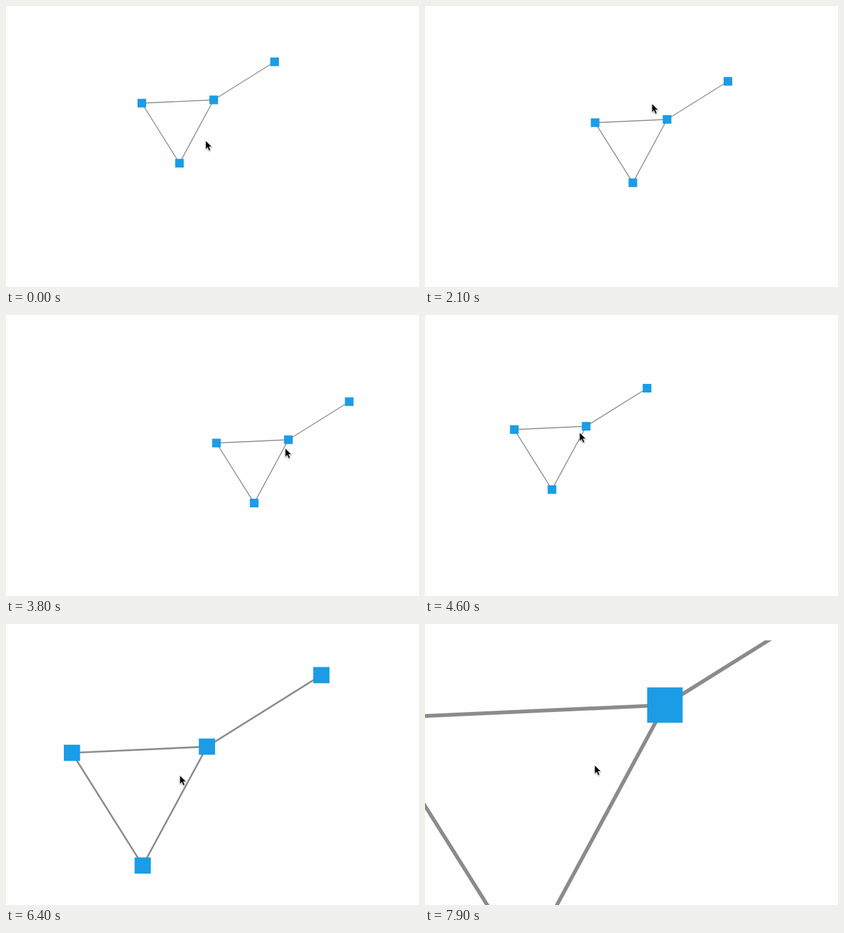
An HTML page for the animation above (8000 ms loop, 628 px wide and 428 px high).

```html
<!DOCTYPE html>
<html lang="en">
<head>
<meta charset="utf-8">
<title>Graph pan and zoom</title>
<style>
  html, body { margin: 0; width: 100%; height: 100%; overflow: hidden; background: #fefefe; }
  svg { display: block; }
  .edge { stroke: #8b8b8b; }
  .node { fill: #1b9ce5; }
  #cursor { filter: drop-shadow(0 1.2px 1px rgba(0, 0, 0, .35)); }
</style>
</head>
<body>
<svg width="628" height="428" viewBox="0 0 628 428">
  <clipPath id="view"><rect y="25" width="628" height="403"/></clipPath>
  <g id="graph" clip-path="url(#view)"></g>
  <path id="cursor" d="M0 0V13.2L3 10.4L5.2 15.4L7.6 14.4L5.4 9.5H9.6Z"
        stroke="#fff" stroke-width=".7" stroke-linejoin="round"/>
</svg>
<script>
const DURATION = 8000, STEP = 100, ZOOM_START = 5500;
const NODE = 13.15, EDGE = 1.4;

// Node positions relative to the hub, which is the second node.
const nodes = [[-109.3, 5], [0, 0], [-52, 96.4], [92.6, -58]];
const edges = [[0, 1], [1, 2], [2, 0], [1, 3]];

// Panning swings the hub between these turning points: [time, position].
const swingX = [[0, 315.8], [1200, 319.3], [1800, 322.7], [2300, 392], [3000, 138.5], [3950, 448], [4500, 242], [5100, 287.8]];
const swingY = [[0, 143], [1200, 141], [1850, 138.7], [2600, 275], [3320, 129], [4280, 251], [4750, 145], [5100, 204.9]];

// Zooming: [time, log of scale] and [scale, hub x, hub y].
const zoomKeys = [[ZOOM_START, 1], [6300, 1.73], [7100, 3.34], [7900, 4.1]]
  .map(([time, scale]) => [time, Math.log(scale)]);
const zoomHub = [[1, 287.8, 204.9], [1.73, 302.2, 190.7], [3.34, 339, 148.5], [4.1, 364.8, 123.5]];

// Distance from the pointer tip to the hub.
const pointerGap = [[0, 12.3, -62], [1200, 17.8, 23], [2800, 27, 24.8], [3800, 4.8, -13], [5600, 16.5, -5.2], [7100, 63, -77.5], [7900, 106.8, -91.5]];

const linear = u => u;
const swing = u => (1 - Math.cos(Math.PI * u)) / 2;

function sample(keys, at, ease = linear) {
  const next = keys.findIndex(key => key[0] > at);
  if (next < 0) return keys[keys.length - 1].slice(1);
  const a = keys[Math.max(0, next - 1)], b = keys[next];
  const u = ease(Math.max(0, (at - a[0]) / (b[0] - a[0] || 1)));
  return a.slice(1).map((value, i) => value + (b[i + 1] - value) * u);
}

const graph = document.getElementById("graph");
const cursor = document.getElementById("cursor");

function add(tag, className) {
  const el = document.createElementNS("http://www.w3.org/2000/svg", tag);
  el.setAttribute("class", className);
  return graph.appendChild(el);
}
function set(el, attrs) {
  for (const name in attrs) el.setAttribute(name, attrs[name]);
}

const lines = edges.map(() => add("line", "edge"));
const squares = nodes.map(() => add("rect", "node"));

function draw(time) {
  const scale = Math.exp(sample(zoomKeys, time)[0]);
  const [x, y] = time < ZOOM_START
    ? [...sample(swingX, time, swing), ...sample(swingY, time, swing)]
    : sample(zoomHub, scale);
  const [gapX, gapY] = sample(pointerGap, time);
  const points = nodes.map(([dx, dy]) => [x + dx * scale, y + dy * scale]);
  const size = NODE * scale;

  edges.forEach(([from, to], i) => set(lines[i], {
    x1: points[from][0], y1: points[from][1],
    x2: points[to][0], y2: points[to][1],
    "stroke-width": EDGE * scale
  }));
  points.forEach(([px, py], i) => set(squares[i], {
    x: px - size / 2, y: py - size / 2, width: size, height: size
  }));
  set(cursor, { transform: `translate(${x - gapX} ${y - gapY})` });
}

const start = performance.now();
function tick() {
  const time = (performance.now() - start) % DURATION;
  draw(Math.floor(time / STEP) * STEP);
  requestAnimationFrame(tick);
}
tick();
</script>
</body>
</html>
```
